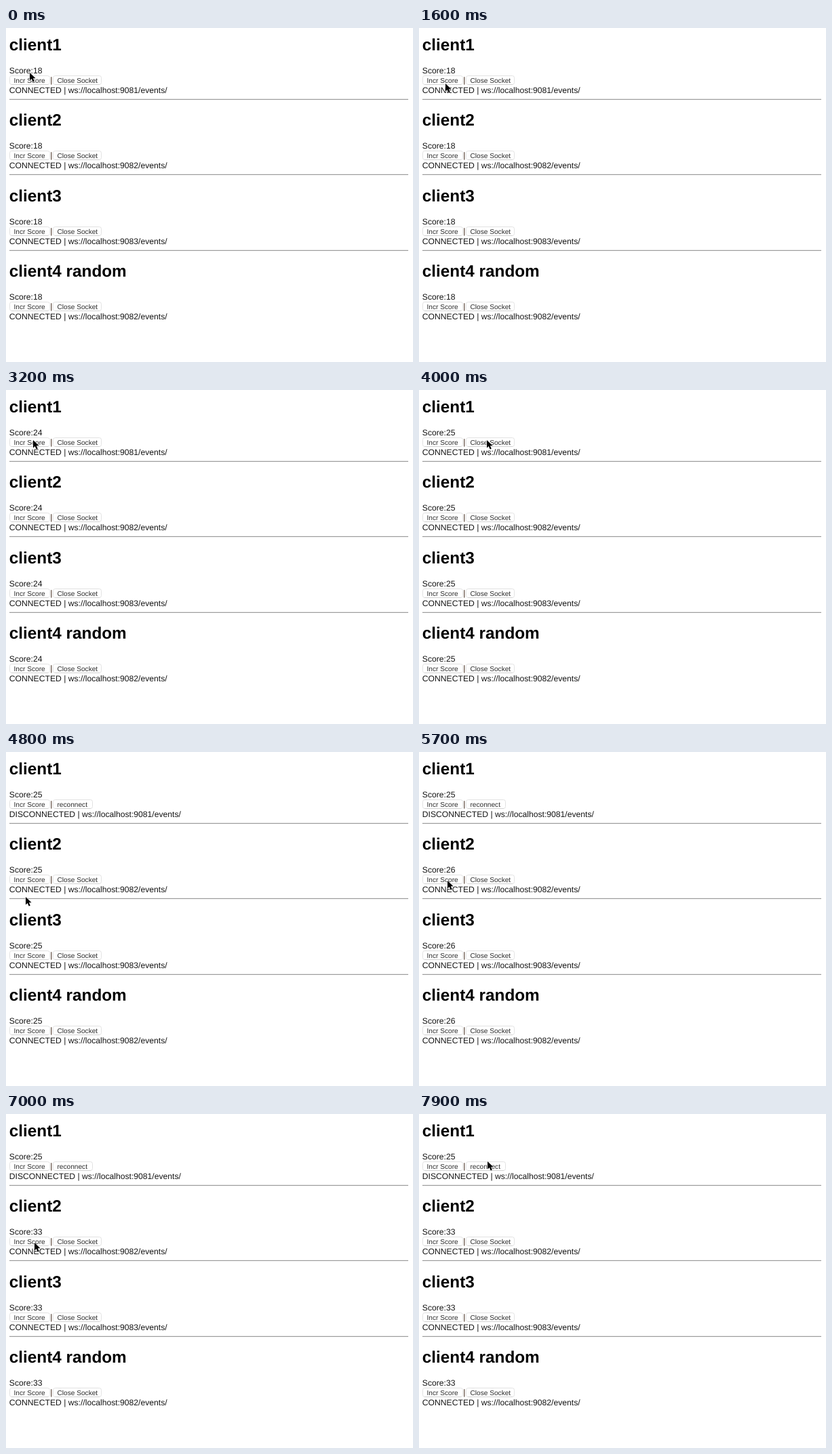
Recreate the animation shown at these times as an HTML page. Size 600 by 493 pixels, loop 8000 ms.

```html
<!DOCTYPE html>
<html lang="en">
<head>
<meta charset="utf-8">
<title>Score clients</title>
<style>
  html, body { margin: 0; width: 100%; height: 100%; overflow: hidden; background: #fff; }
  svg { display: block; width: 100%; height: 100%; }
  text {
    font: 12.16px "Liberation Sans", Arial, sans-serif;
    fill: #161616;
    text-rendering: geometricPrecision;
    white-space: pre;
  }
  .title { font-size: 24.32px; font-weight: bold; fill: #000; }
  .label { font-size: 10.13px; fill: #2c2c2c; }
  .pipe { fill: #3a2414; }
  .button { fill: #fff; stroke: #e2e2e2; stroke-width: 1; }
  .edge { stroke: #cfcfcf; stroke-width: .8; }
  .rule { fill: #9c9c9c; }
</style>
</head>
<body>
<svg id="stage" viewBox="0 0 600 493"></svg>
<script>
const LOOP = 8000, STEP = 100;
const clients = [
  { name: 'client1', port: 9081 },
  { name: 'client2', port: 9082 },
  { name: 'client3', port: 9083 },
  { name: 'client4 random', port: 9082 }
];

// Cursor tip over time: [ms, x, y]
const path = [
  [0, 35, 66], [300, 35, 66], [1200, 39, 82], [1700, 39, 82], [2000, 40, 74],
  [3400, 40, 74], [3800, 100, 74], [4200, 100, 74], [4700, 29, 214],
  [4900, 29, 214], [5300, 42, 190], [7200, 42, 190], [7800, 101, 70], [8000, 101, 70]
];
const closeTime = 4100;
const firstRun = { start: 2100, gap: 200, count: 7 };
const secondRun = { start: 5600, gap: 185, count: 8 };

const stage = document.getElementById('stage');

function add(parent, tag, attrs, content = '') {
  const node = document.createElementNS('http://www.w3.org/2000/svg', tag);
  for (const key in attrs) node.setAttribute(key, attrs[key]);
  node.textContent = content;
  parent.appendChild(node);
  return node;
}

function addButton(parent, x, width, label) {
  const box = add(parent, 'rect', { class: 'button', x, y: 70.5, width, height: 13, rx: 3 });
  const edge = add(parent, 'path', { class: 'edge' });
  const text = add(parent, 'text', { class: 'label', x: x + 6, y: 80.7 });
  const set = (value, w) => {
    text.textContent = value;
    box.setAttribute('width', w);
    edge.setAttribute('d', `M${x + 2.5} 83.5H${x + w - 2.5}`);
  };
  set(label, width);
  return set;
}

const rows = clients.map((client, i) => {
  const g = add(stage, 'g', { transform: `translate(0 ${Math.floor(111.5 * i)})` });
  add(g, 'text', { class: 'title', x: 4.8, y: 33 }, client.name);
  const score = add(g, 'text', { x: 4.8, y: 66.8 });
  addButton(g, 5.5, 59, 'Incr Score');
  add(g, 'text', { class: 'pipe', x: 65.2, y: 80.7 }, '|');
  const setToggle = addButton(g, 69.5, 71, 'Close Socket');
  const status = add(g, 'text', { x: 4.8, y: 96.4 });
  if (i < 3) add(g, 'rect', { class: 'rule', x: 5, y: 104.8, width: 588, height: 1.2 });
  return { client, score, setToggle, status };
});

const cursor = add(stage, 'path', {
  d: 'M0 0V11.6L2.7 9.1L4.7 13.6L6.8 12.7L4.9 8.3H8.6Z',
  fill: '#000', stroke: '#fff', 'stroke-width': 1, 'stroke-linejoin': 'round', 'paint-order': 'stroke'
});

function clicks({ start, gap, count }, t) {
  return t < start ? 0 : Math.min(count, 1 + Math.floor((t - start) / gap));
}

function cursorAt(t) {
  const i = Math.max(1, path.findIndex(p => p[0] >= t));
  const [t0, x0, y0] = path[i - 1], [t1, x1, y1] = path[i];
  const u = (t - t0) / (t1 - t0), e = u * u * (3 - 2 * u);
  return [x0 + (x1 - x0) * e, y0 + (y1 - y0) * e];
}

function render(t) {
  const early = 18 + clicks(firstRun, t);
  const late = early + clicks(secondRun, t);
  rows.forEach(({ client, score, setToggle, status }, i) => {
    const offline = i === 0 && t >= closeTime;
    score.textContent = 'Score:' + (i === 0 ? early : late);
    status.textContent = `${offline ? 'DISCONNECTED' : 'CONNECTED'} | ws://localhost:${client.port}/events/`;
    if (i === 0) offline ? setToggle('reconnect', 58) : setToggle('Close Socket', 71);
  });
  cursor.setAttribute('transform', `translate(${cursorAt(t).join(' ')})`);
}

const begin = performance.now();
function tick() {
  const t = (performance.now() - begin) % LOOP;
  render(Math.floor(t / STEP) * STEP);
  requestAnimationFrame(tick);
}
tick();
</script>
</body>
</html>
```
